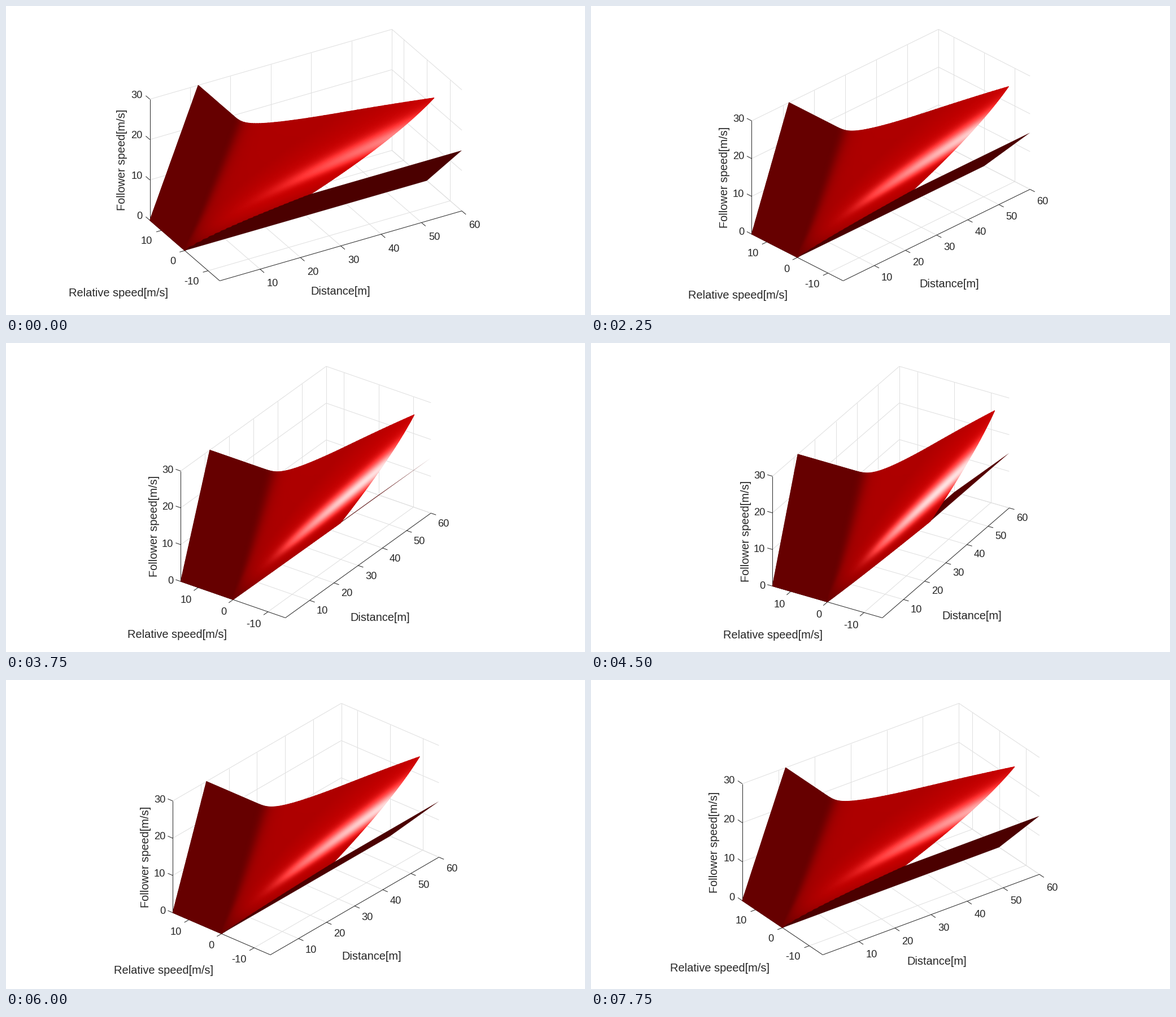
A matplotlib script that plays this animation: 1025x547 px, repeating every 8000 ms.

```python
import numpy as np
import matplotlib.pyplot as plt
from matplotlib.animation import FuncAnimation

W, H, DPI = 1025, 547, 100
PX = 72 / DPI
INK = "#262626"
TOP, BOTTOM, MID = 41.3, 486.5, 530.8
ELEV = np.radians(30)
LIGHT = np.array([0.12, -0.66, 0.74])
plt.rcParams["font.family"] = "Liberation Sans"

fig = plt.figure(figsize=(W / DPI, H / DPI), dpi=DPI, facecolor="white")
ax = fig.add_axes([0, 0, 1, 1])


def safe_gap(v, w):
    """Smallest safe distance at speed v when closing in at speed w."""
    tau, kf, kl = 0.2, 0.0858, 0.136
    bf, bl = 0.5 / kf, 0.5 / kl
    w0 = np.maximum(w, 0)
    grow = w0 + bl * tau
    moving = tau * w0 + bl * tau**2 / 2 + grow**2 / (2 * (bf - bl))
    stopped = tau * v + kf * v**2 - kl * (v - w0) ** 2
    t_equal = tau + grow / (bf - bl)
    s = np.where(v - w0 > bl * t_equal, moving, stopped)
    s = np.where(w > 0, np.maximum(s, 0), 0)
    return ((0.4 * v) ** 2.5 + s**2.5) ** 0.4


def build_surface():
    w, t = np.meshgrid(np.linspace(-15, 15, 121), np.linspace(0, 1, 81))
    low = np.maximum(w, 0)
    v = low + (30 - low) * t
    pts = np.stack([safe_gap(v, w), -w, v], axis=-1)
    n = np.cross(np.gradient(pts, axis=0), np.gradient(pts, axis=1))
    n /= np.linalg.norm(n, axis=-1, keepdims=True) + 1e-12
    n *= np.where(n[..., :1] > 0, -1, 1)
    return pts, n


def build_strip():
    """Plane where the leader stands still, with a stepped inner edge."""
    w = np.linspace(0, 15, 400)
    d = np.floor(safe_gap(w, w))
    d[-1] = safe_gap(15.0, 15.0)
    inner = np.stack([d, -w, w], axis=-1)
    return np.vstack([[60, 0, 0], inner, [60, -15, 15]])


SURF, NORMALS = build_surface()
STRIP = build_strip()


class View:
    def __init__(self, deg):
        a = np.radians(deg)
        s, c = np.sin(a), np.cos(a)
        se, ce = np.sin(ELEV), np.cos(ELEV)
        k = (BOTTOM - TOP) / (60 * s * se + 30 * c * se + 30 * ce)
        self.m = k * np.array([[c, -s, 0], [-s * se, -c * se, -ce]])
        self.eye = np.array([-s * ce, -c * ce, se])
        width = k * (60 * c + 30 * s)
        self.origin = np.array([MID - width / 2 + k * 30 * s, BOTTOM])

    def __call__(self, x, y, z):
        return self.m @ np.array([x, y + 15, z]) + self.origin

    def many(self, p):
        return (p + [0, 15, 0]) @ self.m.T + self.origin

    def direction(self, axis, sign):
        d = self.m[:, axis] * sign
        return d / np.hypot(*d)


def line(p, q, color=INK, z=2):
    ax.plot([p[0], q[0]], [p[1], q[1]], color=color, lw=PX, zorder=z,
            solid_capstyle="butt")


def text(x, y, s, size, ha="center", rot=0):
    dx, dy = (6, 0) if rot else (0, 0.36 * size if size < 19 else 6)
    ax.text(x + dx, y + dy, s, fontsize=size * PX, color=INK, ha=ha,
            va="baseline", rotation=rot, rotation_mode="anchor", zorder=6)


def draw_grid(view):
    def seg(p, q):
        line(view(*p), view(*q), "#dfdfdf", 1)

    for x in range(10, 70, 10):
        seg((x, -15, 0), (x, 15, 0))
        seg((x, 15, 0), (x, 15, 30))
    for y in (-10, 0, 10):
        seg((0, y, 0), (60, y, 0))
        seg((60, y, 0), (60, y, 30))
    for z in (0, 10, 20, 30):
        seg((0, 15, z), (60, 15, z))
        seg((60, 15, z), (60, -15, z))


def draw_axes(view, t):
    near, left = view(0, -15, 0), view(0, 15, 0)
    line(near, view(60, -15, 0))
    line(near, left)
    line(left, view(0, 15, 30))

    out = view.direction(1, -1)
    for v in range(10, 70, 10):
        p = view(v, -15, 0)
        line(p, p + 9.5 * out)
        text(p[0] + 22.5, p[1] + 10.2 + 21 * out[1], str(v), 18.3)

    out = view.direction(0, -1)
    for v in (-10, 0, 10):
        p = view(0, v, 0)
        line(p, p + 9.5 * out)
        text(p[0] + 12.4 + 29.6 * out[0], p[1] + 14.7 + 10 * out[1],
             str(v), 18.3, "right")

    out = view.direction(1, 1)
    for v in (0, 10, 20, 30):
        p = view(0, 15, v)
        line(p, p + 9.5 * out)
        text(p[0] - 13, p[1] + 3.1 + 18.4 * out[1], str(v), 18.3, "right")

    x, y = view(30, -15, 0)
    text(x + 1.55 * t, y + 80 + 0.467 * t, "Distance[m]", 20)
    x, y = view(0, 0, 0)
    text(x - 117 + 0.9 * t - 0.0067 * t * t, y + 75.5 - 0.567 * t,
         "Relative speed[m/s]", 20)
    x, y = view(0, 15, 15)
    text(x - 50 + 0.1 * t, y, "Follower speed[m/s]", 20, rot=90)


def draw_surface(view):
    diff = NORMALS @ LIGHT
    refl = 2 * diff[..., None] * NORMALS - LIGHT
    spec = 0.9 * np.clip(refl @ view.eye, 0, 1) ** 10 * (diff > 0)
    red = 0.3 + 0.6 * np.clip(diff, 0, 1) + spec
    rgb = np.clip(np.stack([red, spec, spec], axis=-1), 0, 1)
    p = view.many(SURF)
    ax.pcolormesh(p[..., 0], p[..., 1], rgb, shading="gouraud", zorder=4)

    from_above = view.eye[1] + view.eye[2] > 0
    ax.fill(*view.many(STRIP).T, color="#550000" if from_above else "#4b0000",
            lw=0, zorder=3 if from_above else 5)


def update(i):
    ax.clear()
    ax.axis("off")
    step = max(0, i - 1)
    t = min(1.8 * step, 30) if step <= 17 else 30 - 1.8 * (step - 17)
    view = View(30 + t)
    draw_grid(view)
    draw_axes(view, t)
    draw_surface(view)
    ax.set_xlim(0, W)
    ax.set_ylim(H, 0)
    return []


anim = FuncAnimation(fig, update, frames=32, interval=250, repeat=True,
                     repeat_delay=0, init_func=lambda: [])
plt.show()
```
